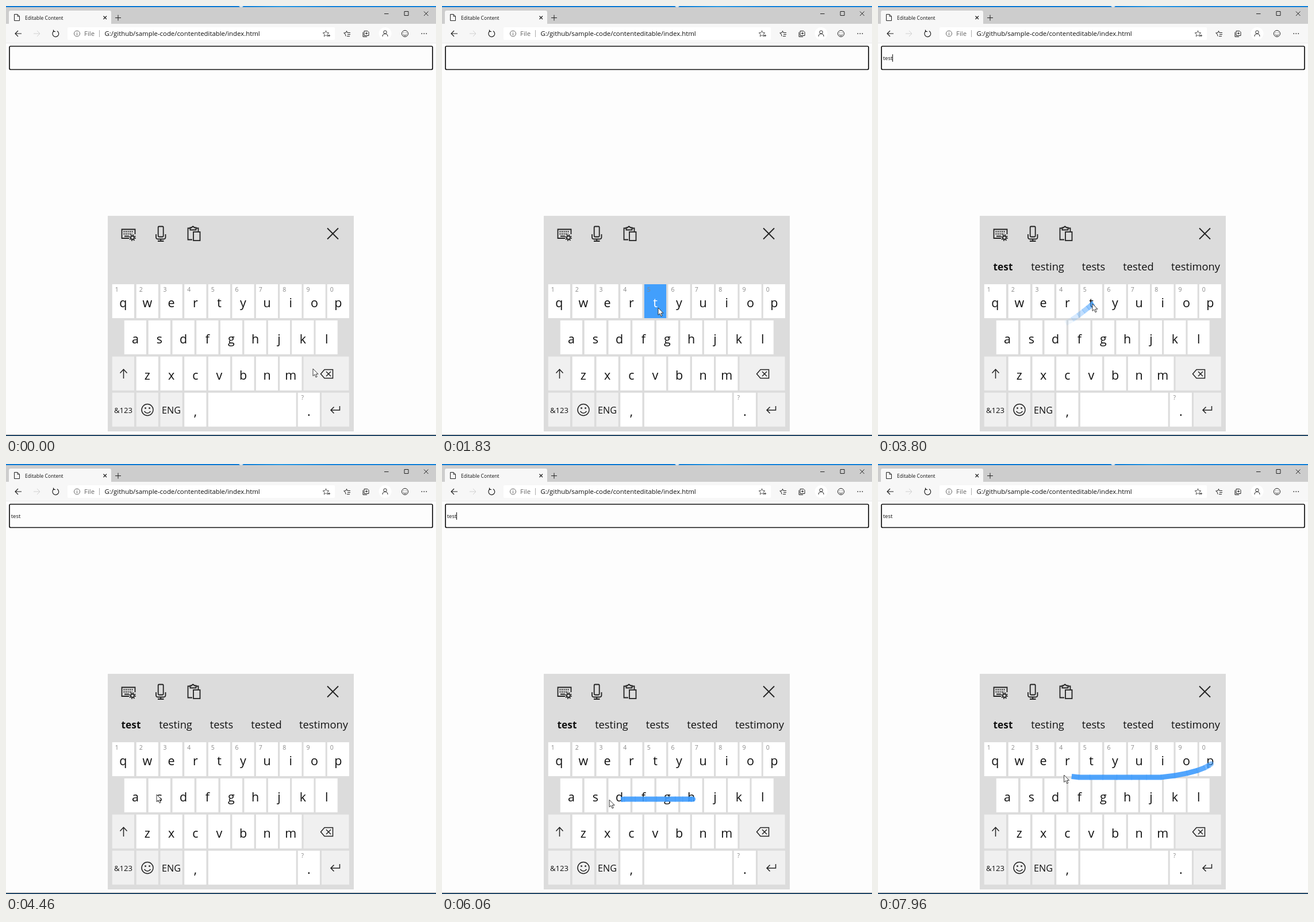
Animation, 748 px wide and 748 px high, one loop 8 s. Source, as an HTML page:

```html
<!DOCTYPE html>
<html lang="en">
<head>
<meta charset="utf-8">
<title>Swipe typing</title>
<style>
html, body { margin: 0; width: 100%; height: 100%; overflow: hidden; background: #fdfdfd; }
svg { display: block; width: 100vw; height: 100vh; }
text { font-family: "Open Sans", "Noto Sans", sans-serif; fill: #111; white-space: pre; }
.mid text { text-anchor: middle; }
.icon { fill: none; stroke: #222; }
</style>
</head>
<body>
<svg viewBox="0 0 748 748">
  <defs>
    <linearGradient id="sky">
      <stop offset=".53" stop-color="#0b78d4"/><stop offset=".64" stop-color="#2b9ae4"/>
      <stop offset=".76" stop-color="#1684dc"/><stop offset="1" stop-color="#1180d8"/>
    </linearGradient>
  </defs>

  <!-- window frame, tab and toolbar -->
  <rect width="748" height="748" fill="#fdfdfd"/>
  <rect width="748" height="32" fill="#cdcdcd"/>
  <rect width="748" height="2" fill="url(#sky)"/>
  <path d="M405 0h8l-2 2h-4z" fill="#d5e6f2"/>
  <path d="M5 32V11q0-3 3-3H180q3 0 3 3V32z" fill="#f7f7f7"/>
  <rect y="31" width="748" height="33" fill="#f7f7f7"/>
  <rect y="64" width="748" height="1" fill="#ececec"/>
  <rect x="107" y="37" width="465" height="22" rx="2" fill="#fff"/>
  <circle cx="659.5" cy="48" r="11" fill="#fff"/>

  <g class="icon">
    <path d="M14.5 14.5h5.5l3.5 3.5v7.5h-9zM20 14.5v3.5h3.500"/>
    <path d="M169.5 17.500l5.500 5.500m0-5.500l-5.500 5.500" stroke-width="1.200"/>
    <path d="M190 20.5h10m-5-5v10"/>
    <path d="M658 13.5h7.5M693 9.5h7v7h-7zM727 9.5l7.500 7.500m0-7.500l-7.500 7.500"/>
    <path d="M27 48H16m5-5l-5 5 5 5" stroke-width="1.200"/>
    <path d="M48 48h11m-5-5l5 5-5 5" stroke="#d0d0d0"/>
    <path d="M84 43.3a5.400 5.400 0 1 0 5 .2M82.500 41.500v3h3.500" stroke-width="1.200"/>
    <g stroke="#666"><circle cx="123.500" cy="48" r="5"/><path d="M123.500 47v4m0-6v1"/></g>
    <path d="M162.5 42v12" stroke="#aaa"/>
    <path d="M556.500 42.800l1.500 3.500 3.800.4-2.900 2.500.9 3.700-3.300-2-3.300 2 .9-3.700-2.900-2.500 3.800-.4z" stroke="#555"/>
    <path d="M560 51.500h4m-2-2v4" stroke="#333"/>
    <path d="M591 52.500l-.8-3.300-2.500-2.300 3.400-.3 1.400-3.300 1.400 3.300M594 46.500h5m-5 3h5m-6 3h5"/>
    <path d="M623 43.500h6l2 2v6h-8zM621 45.500v8h7M625 47.500h4m-2-2v4"/>
    <circle cx="659.5" cy="45.500" r="2.700"/>
    <path d="M655 53q0-4.500 4.500-4.500t4.500 4.500"/>
    <circle cx="694" cy="48" r="5.500"/>
    <path d="M691 49.500q3 3.500 6 0M692 46v1m4-1v1"/>
    <path d="M722.500 48h10" stroke-width="1.600" stroke-dasharray="1.600 2.400"/>
  </g>
  <text x="33" y="23.500" font-size="8.600">Editable Content</text>
  <text x="136" y="52" font-size="11.400" style="fill:#666">File</text>
  <text x="171.500" y="52" font-size="11.400">G:/github/sample-code/contenteditable/index.html</text>

  <!-- editable field -->
  <rect x="6" y="70" width="736" height="40.500" rx="2" fill="#fdfdfd" stroke="#111" stroke-width="1.700"/>
  <text id="typed" x="8.700" y="94" font-size="9.600">test</text>
  <rect id="caret" y="84" width="1" height="13" fill="#111"/>
  <rect y="746" width="748" height="1" fill="#1c2733"/>
  <rect y="747" width="748" height="1" fill="#235f92"/>

  <!-- touch keyboard -->
  <rect x="177" y="365" width="428" height="375" fill="#dcdcdc"/>
  <g class="icon" stroke-width="1.800">
    <path d="M214 404h-12.500v-15.500h23v8.500M206 400.500h8"/>
    <path d="M204.500 392.500h17m-17 4h15" stroke-dasharray="2 1.500"/>
    <circle cx="220" cy="403" r="3"/>
    <circle cx="220" cy="403" r="5" stroke-dasharray="1.800 2.127"/>
    <rect x="264.700" y="383.500" width="9" height="18" rx="1.500"/>
    <path d="M261 397v5q0 3.500 3.500 3.500h9.500q3.500 0 3.500-3.500v-5M269.200 405.500v3.500M264 409h10.500"/>
    <path d="M324 406.500h-7.500v-20h4M330 386.500h4.500v6M320.500 389.500v-4h2.500q2.200-4 4.500 0h3v4z"/>
    <rect x="326" y="393" width="11.500" height="15"/>
    <path d="M559 386.500l19 19m0-19l-19 19"/>
  </g>
  <g id="words" class="mid" font-size="18.300">
    <text x="217.500" y="460" font-size="17.300" font-weight="700">test</text>
    <text x="295" y="460">testing</text>
    <text x="375" y="460">tests</text>
    <text x="453" y="460">tested</text>
    <text x="552.500" y="460">testimony</text>
  </g>
  <g id="keys" class="mid"></g>
  <g class="icon" stroke-width="1.500">
    <path d="M204.500 648v-16m-6 6.500l6-6.500 6 6.500"/>
    <path d="M547.500 640l6.500-7.500h14.500v15H554zM557 636l8 8m0-8l-8 8"/>
    <circle cx="246" cy="702.500" r="10"/>
    <path d="M240.500 705q5.500 6.500 11 0"/>
    <path d="M241.300 699.500h12" stroke-width="2.500" stroke-dasharray="2.500 4.500"/>
    <path d="M565 703h15.500v-7M570.500 697.500l-5.500 5.500 5.500 5.500"/>
  </g>

  <g id="trail" stroke="#3f9cfd" stroke-width="9"></g>
  <path id="pointer" d="M0 0V12.500L2.900 9.900 5 14.800 7.100 13.900 5 9.200H9Z" fill="#fff" stroke="#222" stroke-width=".9"/>
</svg>

<script>
const LOOP = 8000, STEP = 33, LAG = 40, FULL = 380, LIFE = 620;
const PRESS_T = 1830, COMMIT = 3715, PRESS_S = 4470;
const BLUE = '#429ffc', GRAY = '#f0f0f0', NS = 'http://www.w3.org/2000/svg';
const $ = id => document.getElementById(id);
const clamp = (v, a, b) => Math.min(b, Math.max(a, v));
const ease = u => u * u * (3 - 2 * u);

function set(el, attrs) {
  for (const k in attrs) el.setAttribute(k, attrs[k]);
  return el;
}
function add(parent, tag, attrs, text = '') {
  const el = set(document.createElementNS(NS, tag), attrs);
  el.textContent = text;
  return parent.appendChild(el);
}
const show = (id, on) => $(id).setAttribute('visibility', on ? 'visible' : 'hidden');

// keyboard: columns close up slightly towards the right
const keys = {};
const column = i => 184.8 + 41.95 * i - 0.045 * i * i;
const row = i => 484 + 62.9 * i;
function addKey(name, x, y, { w = 38.2, fill = '#fff', size = 21.5, dy = 40, hint } = {}) {
  const rect = add($('keys'), 'rect', { x, y, width: w, height: 59, fill });
  if (hint) add($('keys'), 'text', { x: x + 8, y: y + 12.5, 'font-size': 10.5, style: 'fill:#888' }, hint);
  const label = add($('keys'), 'text', { x: x + w / 2, y: y + dy, 'font-size': size }, name);
  keys[name] = { rect, label };
}
[...'qwertyuiop'].forEach((c, i) => addKey(c, column(i), row(0), { hint: String((i + 1) % 10) }));
[...'asdfghjkl'].forEach((c, i) => addKey(c, column(i) + 21, row(1)));
[...'zxcvbnm'].forEach((c, i) => addKey(c, column(i + 1), row(2)));
addKey('', column(0), row(2), { fill: GRAY });
addKey('', column(8), row(2), { fill: GRAY, w: 79 });
addKey('&123', column(0), row(3), { fill: GRAY, size: 13.1, dy: 35 });
addKey('', column(1), row(3), { fill: GRAY });
addKey('ENG', column(2), row(3), { fill: GRAY, size: 16.2, dy: 36.5 });
addKey(',', column(3), row(3));
addKey('', column(4), row(3), { w: 152.8 });
addKey('.', 507.7, row(3), { hint: '?' });
addKey('', 549, row(3), { fill: GRAY, w: 48 });

// stalls [start, length] freeze everything but the caret
const stalls = [[4500, 230], [4960, 170], [6960, 170]];
const active = t => stalls.reduce((s, [a, d]) => s - clamp(t - a, 0, d), t);

// each move eases along its curve, and the pointer rests in between
const moves = [
  [430, 1200, 'M534 631Q520 665 460 598T376 525'],
  [1930, 2800, 'M376 525Q270 530 263 578'],
  [2950, 3430, 'M263 578Q320 560 350 537T373 518'],
  [3830, 4430, 'M373 518Q330 570 262 575'],
  [4730, 5370, 'M262 575Q310 580 340 580L436 583'],
  [5720, 6210, 'M436 583H320L250 586'],
  [6380, 7236, 'M250 584Q350 579 470 552C495 542 495 535 530 533Q570 528 579 522'],
  [7500, 8005, 'M579 522Q560 537 495 545H345L318 540']
].map(([from, to, d]) => {
  const curve = set(document.createElementNS(NS, 'path'), { d });
  return { from: active(from), to: active(to), curve, length: curve.getTotalLength() };
});

function pointerAt(t) {
  const m = moves.filter(m => m.from <= t).pop() || moves[0];
  const u = clamp((t - m.from) / (m.to - m.from), 0, 1);
  return m.curve.getPointAtLength(m.length * ease(u));
}

const isDown = t => (t >= PRESS_T && t < COMMIT) || t >= PRESS_S;
const span = (p, q) => Math.hypot(q.x - p.x, q.y - p.y);
const lines = Array.from({ length: Math.ceil(LIFE / STEP) }, () => add($('trail'), 'line', {}));

function drawTrail(now) {
  const head = now - LAG, last = Math.floor(head / STEP);
  lines.forEach((line, i) => {
    const t = (last - i) * STEP;
    const p = pointerAt(t), q = pointerAt(Math.min(t + STEP, head));
    const len = span(p, q);
    const fade = clamp((LIFE - now + t) / (LIFE - FULL), 0, 1);
    const alpha = isDown(t) && len > 0.05 ? 0.9 * fade : 0;
    line.setAttribute('opacity', alpha);
    if (!alpha) return;
    // slight overlap leaves the faint ribs between pieces
    const ex = (q.x - p.x) / len * 0.5, ey = (q.y - p.y) / len * 0.5;
    const first = span(pointerAt(t - STEP), p) < 0.05;
    set(line, {
      x1: p.x - ex, y1: p.y - ey, x2: q.x + ex, y2: q.y + ey,
      'stroke-linecap': first ? 'round' : 'butt'
    });
  });
}

function press(name, on) {
  keys[name].rect.setAttribute('fill', on ? BLUE : '#fff');
  keys[name].label.style.fill = on ? '#fff' : '';
}

function draw(t) {
  const now = active(t), typed = t >= COMMIT;
  const { x, y } = pointerAt(now);
  $('pointer').setAttribute('transform', `translate(${x} ${y})`);
  drawTrail(now);
  press('t', now >= PRESS_T && now < 1990);
  press('s', now >= PRESS_S && now < 4505);
  show('typed', typed);
  show('words', typed);
  $('caret').setAttribute('x', typed ? 25 : 9);
  const blinks = Math.floor((t - (typed ? COMMIT : 30)) / 535);
  show('caret', blinks % 2 === 0);
}

const start = performance.now();
function tick() {
  draw((performance.now() - start) % LOOP);
  requestAnimationFrame(tick);
}
draw(0);
requestAnimationFrame(tick);
</script>
</body>
</html>
```
